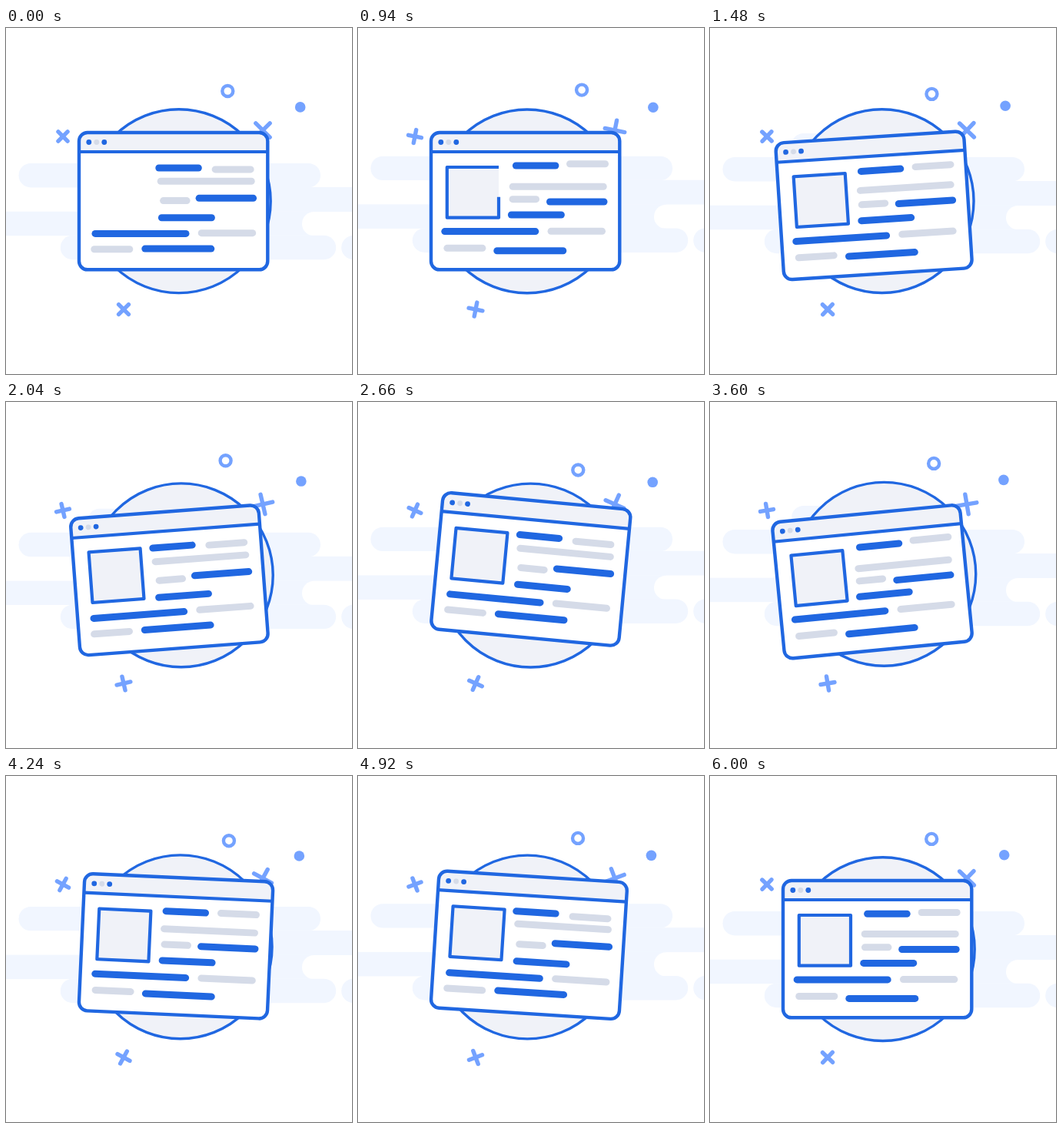
An HTML page with a canvas for the animation above (6020 ms loop, 450x450 px).

```html
<!DOCTYPE html>
<html lang="en">
<head>
<meta charset="utf-8">
<title>Browser window</title>
<style>
  html, body { margin: 0; width: 100%; height: 100%; overflow: hidden; background: #fff; }
  canvas { display: block; width: 450px; height: 450px; }
</style>
</head>
<body>
<canvas id="stage"></canvas>
<script>
const SIZE = 450, LOOP = 6.02, TAU = Math.PI * 2;
const BLUE = '#2067e1', SKY = '#74a2ff', GREY = '#d5dbe8', PALE = '#f0f2f8', CLOUD = '#f1f6ff';

const canvas = document.getElementById('stage');
const ctx = canvas.getContext('2d');
const dpr = window.devicePixelRatio || 1;
canvas.width = canvas.height = SIZE * dpr;

// Waves that run k times per loop
const sin = (t, k) => Math.sin(TAU * k * t / LOOP);
const cos = (t, k) => Math.cos(TAU * k * t / LOOP);

function ease(t, from, to) {
  const u = Math.min(1, Math.max(0, (t - from) / (to - from)));
  return (1 - Math.cos(Math.PI * u)) / 2;
}

// Window tilt: out to one side, three full swings, back to level
function rock(t) {
  const start = 0.935, step = 0.905, tilt = 5.6, swings = 5;
  let angle = 0;
  for (let i = 0; i < swings; i++) {
    const span = i === 0 || i === swings - 1 ? tilt : 2 * tilt;
    const side = i % 2 ? 1 : -1;
    angle += side * span * ease(t, start + i * step, start + (i + 1) * step);
  }
  return angle * Math.PI / 180;
}

function pill(x1, y, x2, color) {
  ctx.fillStyle = color;
  ctx.beginPath();
  ctx.roundRect(x1, y, x2 - x1, 31.4, 15.7);
  ctx.fill();
}

function disc(x, y, r, fill, stroke, width) {
  ctx.beginPath();
  ctx.arc(x, y, r, 0, TAU);
  ctx.fillStyle = fill;
  ctx.fill();
  if (!stroke) return;
  ctx.strokeStyle = stroke;
  ctx.lineWidth = width;
  ctx.stroke();
}

function segment(x1, y1, x2, y2, color, width, cap = 'round') {
  ctx.strokeStyle = color;
  ctx.lineWidth = width;
  ctx.lineCap = cap;
  ctx.beginPath();
  ctx.moveTo(x1, y1);
  ctx.lineTo(x2, y2);
  ctx.stroke();
}

function cross(t, x, y, arm) {
  ctx.save();
  ctx.translate(x, y);
  ctx.rotate(Math.PI / 4 + TAU * t / LOOP);
  segment(-arm, 0, arm, 0, SKY, 5.4);
  segment(0, -arm, 0, arm, SKY, 5.4);
  ctx.restore();
}

function cloud(t) {
  ctx.save();
  ctx.translate(0, -4 * (1 - cos(t, 1)) - 3.8 * (1 - cos(t, 3)));
  pill(106, 145, 320, CLOUD);
  pill(16.5, 176, 409, CLOUD);
  ctx.fillRect(200, 207, 270, 32);
  ctx.fillRect(-20, 238.7, 421, 31.5);
  pill(385, 239, 480, '#fff');
  pill(70.8, 269.8, 429.2, CLOUD);
  pill(436.2, 269.8, 490, CLOUD);
  ctx.restore();
}

function backdrop(t) {
  const x = 223.9 + 2.9 * cos(t, 3) - 2 * cos(t, 1);
  const y = 224.4 + 1.5 * sin(t, 1) + 0.8 * cos(t, 2);
  disc(x, y, 119.4, PALE, BLUE, 3.4);
}

function ring(t) {
  const x = 288.3 + 3 * sin(t, 2);
  const y = 82 + 3.6 * sin(t, 5) - 3 * sin(t, 4);
  disc(x, y, 7, '#fff', SKY, 4.4);
}

function dot(t) {
  disc(382.7 + 1.4 * sin(t, 1), 102.9 + 1.6 * sin(t, 3), 6.8, SKY);
}

// The outline draws itself anticlockwise from the top right corner
function picture(t) {
  const x = 115.8, y = 181, w = 67.2, h = 65.7, len = 2 * (w + h);
  const p = ease(t, 0.1, 1.22);
  ctx.save();
  ctx.globalAlpha = ease(t, 0.1, 0.8);
  ctx.fillStyle = PALE;
  ctx.fillRect(x, y, w, h);
  ctx.globalAlpha = 1;
  ctx.strokeStyle = BLUE;
  ctx.lineWidth = 4.2;
  ctx.lineCap = 'butt';
  ctx.lineJoin = 'round';
  ctx.beginPath();
  ctx.moveTo(x + w, y);
  ctx.lineTo(x, y);
  ctx.lineTo(x, y + h);
  ctx.lineTo(x + w, y + h);
  ctx.closePath();
  if (p < 1) ctx.setLineDash([len * p, len]);
  if (p > 0) ctx.stroke();
  ctx.restore();
}

// All text bars sway on one wave, each with its own reach
function textBars(t) {
  const wave = Math.cos(2.4 * t + 0.6);
  const bar = (color, len, x, y, dx, dy) => {
    const cx = x + dx * wave, cy = y + dy * wave;
    segment(cx - len / 2, cy, cx + len / 2, cy, color, 9);
  };
  bar(GREY, 46, 296.7, 180.6, -1.9, 4);
  bar(BLUE, 51.5, 227.6, 180.6, -3.7, 1.7);
  bar(GREY, 118, 260.2, 202.5, 0, -3.9);
  bar(GREY, 30.5, 218.2, 223.7, 2, 1.1);
  bar(BLUE, 70.5, 285.6, 223.5, 0.9, -2.6);
  bar(BLUE, 65, 233.5, 245, 1.7, 2.1);
  bar(BLUE, 118, 173.5, 266.1, 1.8, 1.6);
  bar(GREY, 66.5, 286, 265.6, 1.8, 1.3);
  bar(GREY, 46, 138.3, 287.1, -0.6, 0.8);
  bar(BLUE, 86, 223.8, 288.3, 0, -1.5);
}

function browser(t) {
  ctx.save();
  ctx.translate(304, 298);
  ctx.rotate(rock(t));
  ctx.translate(-304, -298);
  const frame = new Path2D();
  frame.roundRect(95, 136, 245.3, 178.3, 11);
  ctx.fillStyle = '#fff';
  ctx.fill(frame);
  ctx.save();
  ctx.clip(frame);
  ctx.fillStyle = PALE;
  ctx.fillRect(95, 136, 246, 25);
  ctx.restore();
  segment(95, 161, 340, 161, BLUE, 4.2, 'butt');
  ctx.strokeStyle = BLUE;
  ctx.lineWidth = 4.4;
  ctx.stroke(frame);
  [BLUE, GREY, BLUE].forEach((c, i) => disc(107.8 + 10 * i, 148.5, 3.4, c));
  picture(t);
  textBars(t);
  ctx.restore();
}

function draw(t) {
  ctx.setTransform(dpr, 0, 0, dpr, 0, 0);
  ctx.fillStyle = '#fff';
  ctx.fillRect(0, 0, SIZE, SIZE);
  cloud(t);
  backdrop(t);
  cross(t, 74, 141, 8.6);
  cross(t, 153, 366, 9.1);
  cross(t, 334, 133, 13);
  ring(t);
  dot(t);
  browser(t);
}

function tick(now) {
  draw((now / 1000) % LOOP);
  requestAnimationFrame(tick);
}
draw(0);
requestAnimationFrame(tick);
</script>
</body>
</html>
```
